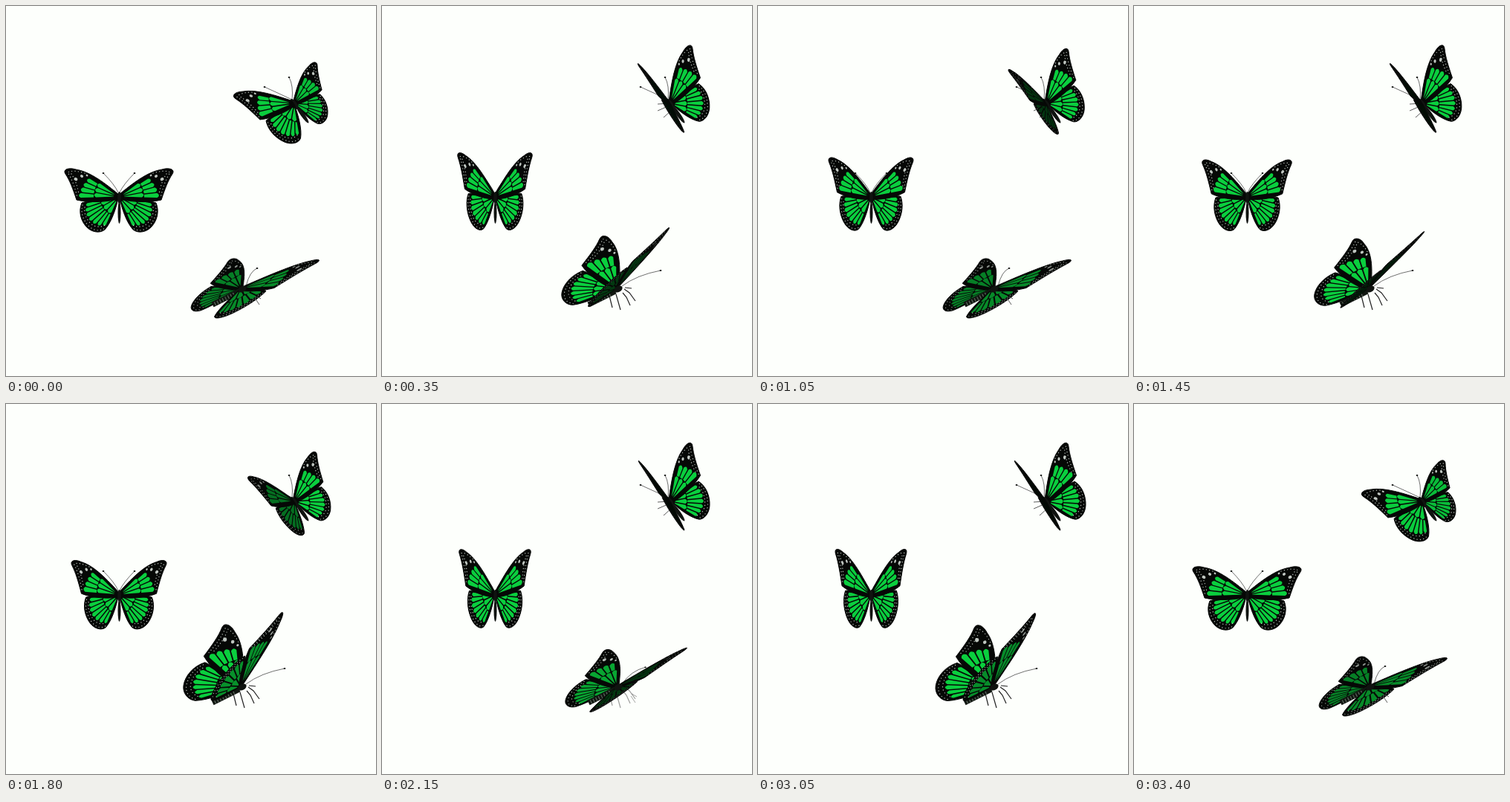
Write an HTML page with a canvas that moves like this. It is 498x498 px and loops after 3450 ms.

```html
<!DOCTYPE html>
<html>
<head>
<meta charset="utf-8">
<style>
  html, body { margin: 0; width: 100%; height: 100%; overflow: hidden; background: #fdfffc; }
  canvas { display: block; }
</style>
</head>
<body>
<canvas id="stage" width="498" height="498"></canvas>
<script>
const ctx = document.getElementById('stage').getContext('2d');
const FRAME = 50, LOOP = 3450;

// Adds a ring of cells between veins that radiate from the hinge (angles in degrees).
function addFan(path, from, to, count, inner, outer) {
  const polar = (r, degrees, shift) => {
    const angle = degrees * Math.PI / 180 + shift / r;
    return [r * Math.cos(angle), r * Math.sin(angle)];
  };
  const size = (to - from) / count;
  for (let i = 0; i < count; i++) {
    const a = from + i * size, b = a + size, mid = (a + b) / 2, r = outer(mid);
    path.moveTo(...polar(inner, a, .7));
    path.lineTo(...polar(r - 2, a, .7));
    path.quadraticCurveTo(...polar(r + 3, mid, 0), ...polar(r - 2, b, -.7));
    path.lineTo(...polar(inner, b, -.7));
    path.closePath();
  }
}

// Flat wing parts with the hinge at 0,0.
const fore = {
  shape: new Path2D('M1-4C17-17 38-34 58-37C68-40 76-37 72-31C66-22 62-11 57 4C40 8 18 7 1 3Z'),
  cells: new Path2D(),
  dots: new Path2D('M46-32Q62-37 69-33Q61-21 56 1M64-31Q57-21 54-4'),
  spots: [[58, -24, 2.5], [50, -28, 2.2], [43, -29, 1.5]]
};
addFan(fore.cells, -37, 2, 3, 7, () => 33);
addFan(fore.cells, -33, 2, 4, 34, a => 54 + a / 5);

const hind = {
  shape: new Path2D('M1 2C20 4 40 4 50 8C55 20 51 33 43 41C36 48 25 49 19 44C10 34 4 16 1 2Z'),
  cells: new Path2D(),
  dots: new Path2D('M49 11Q53 25 41 39Q30 49 19 42M46 14Q48 25 38 36Q29 43 19 38'),
  spots: []
};
addFan(hind.cells, 11, 66, 3, 7, () => 25);
addFan(hind.cells, 10, 66, 7, 26, a => 50 - ((a - 36) / 10) ** 2);

const easeOut = power => u => 1 - (1 - u) ** power;
const easeSine = u => Math.sin(u * Math.PI / 2);

// Wings rise until `peak` and are down again at `end` of each beat.
const beatA = { period: 17, peak: 10, end: 17, up: easeOut(2), down: u => u * u };
const beatB = { period: 23, peak: 14, end: 21, up: easeSine, down: easeSine };
const beatC = { period: 17, peak: 10, end: 17, up: easeOut(3), down: easeOut(3) };

function liftAt(step, { period, peak, end, up, down }) {
  const phase = step % period;
  return phase < peak ? up(phase / peak) : down(Math.max(0, (end - phase) / (end - peak)));
}

// Lowered and raised wing: span vector, then body axis vector; `glow` is extra light.
const rightA = { low: [1, 0, 0, 1], high: [.68, -.29, .05, 1.1], glow: .25 };
const leftA = { low: [-1, 0, 0, 1], high: [-.68, -.29, -.05, 1.1], glow: .25 };
const rightB = { low: [.87, -.07, -1.18, .89], high: [.27, -.96, -1, .85], glow: 0 };
const leftB = { low: [-.65, -.17, -.94, .75], high: [-.8, -.77, -1.04, .77], glow: 0 };
const rightC = { low: [.62, -.37, .44, .78], high: [.67, -.67, .59, .84], glow: .3 };
const leftC = { low: [-.85, .32, .56, .93], high: [-.31, -.26, .56, .97], glow: 0 };

function drawPart(part, matrix, light) {
  const project = path => {
    const result = new Path2D();
    result.addPath(path, matrix);
    return result;
  };
  const shape = project(part.shape);
  ctx.fillStyle = ctx.strokeStyle = '#060806';
  ctx.lineWidth = 1;
  ctx.fill(shape);
  ctx.stroke(shape);
  ctx.fillStyle = `rgb(${10 * light},${207 * light},${62 * light})`;
  ctx.fill(project(part.cells));
  ctx.save();
  ctx.globalAlpha = Math.min(.85, light);
  ctx.fillStyle = ctx.strokeStyle = '#dfe6e0';
  ctx.lineCap = 'round';
  ctx.lineWidth = 1.4;
  ctx.setLineDash([0, 4.4]);
  ctx.stroke(project(part.dots));
  for (const [x, y, r] of part.spots) {
    const spot = new Path2D();
    spot.ellipse(x, y, r, r * .8, -.6, 0, 7);
    ctx.fill(project(spot));
  }
  ctx.restore();
}

function drawWing(x, y, { low, high, glow }, lift) {
  const [a, b, c, d] = low.map((v, i) => v + (high[i] - v) * lift);
  const facing = Math.abs(a * d - b * c);
  const light = Math.max(0, Math.min(1, facing * 1.15 - .13 + glow));
  const matrix = new DOMMatrix([a, b, c, d, x, y]);
  drawPart(hind, matrix, light);
  drawPart(fore, matrix, light);
}

function drawLine(path, width = .8, color = '#333') {
  ctx.strokeStyle = color;
  ctx.lineWidth = width;
  ctx.stroke(new Path2D(path));
}

function drawOval(x, y, rx, ry, angle) {
  ctx.fillStyle = '#101310';
  ctx.beginPath();
  ctx.ellipse(x, y, rx, ry, angle, 0, 7);
  ctx.fill();
}

function drawAntenna(x, y, cx, cy, endX, endY) {
  drawLine(`M${x} ${y}Q${cx} ${cy} ${endX} ${endY}`, .7);
  drawOval(endX, endY, 1.4, .9, 0);
}

function drawA(lift) {
  for (const side of [-1, 1]) {
    drawAntenna(152 + side, 251, 152 + 6 * side, 240, 152 + 21 * side, 225);
  }
  drawWing(152, 257, leftA, lift);
  drawWing(152, 257, rightA, lift);
  drawOval(152.5, 258, 2.3, 8, 0);
  drawOval(152.5, 278, 2, 15, 0);
}

function drawB(lift) {
  const raised = Math.min(1, lift * 2);
  drawWing(316, 380, leftB, lift);
  drawAntenna(323, 377, 328 + 15 * raised, 357 + 5 * raised, 338 + 37 * raised, 353 + 3 * raised);
  ctx.globalAlpha = raised;
  drawLine('M306 390L310 406M315 388L321 409M324 386L329 392 334 403M326 381L333 386 341 397M327 379L336 380', 1.2, '#222');
  ctx.globalAlpha = 1 - raised;
  drawLine('M335 393L341 402M336 390L343 394');
  ctx.globalAlpha = 1;
  drawLine('M278 402L314 384', 7, '#111711');
  ctx.setLineDash([1, 3]);
  drawLine('M281 401L309 387', 5, '#68736a');
  ctx.setLineDash([]);
  drawWing(316, 380, rightB, lift);
  drawOval(318, 381, 6, 4, -.5);
}

function drawC(lift) {
  drawAntenna(385, 126, 368, 118, 348, 109);
  drawAntenna(385, 126, 387, 107, 381, 96);
  drawLine('M387 131L371 132M387 134L371 141M390 140L379 150');
  drawWing(388, 131, rightC, lift);
  drawOval(388, 132, 3.5, 8, -.6);
  drawOval(399, 146, 2.6, 14, -.62);
  drawWing(388, 131, leftC, lift);
}

function draw(now) {
  const step = Math.floor(now % LOOP / FRAME);
  ctx.clearRect(0, 0, 498, 498);
  drawA(liftAt(step, beatA));
  drawB(liftAt(step, beatB));
  drawC(liftAt(step, beatC));
  requestAnimationFrame(draw);
}
requestAnimationFrame(draw);
</script>
</body>
</html>
```
